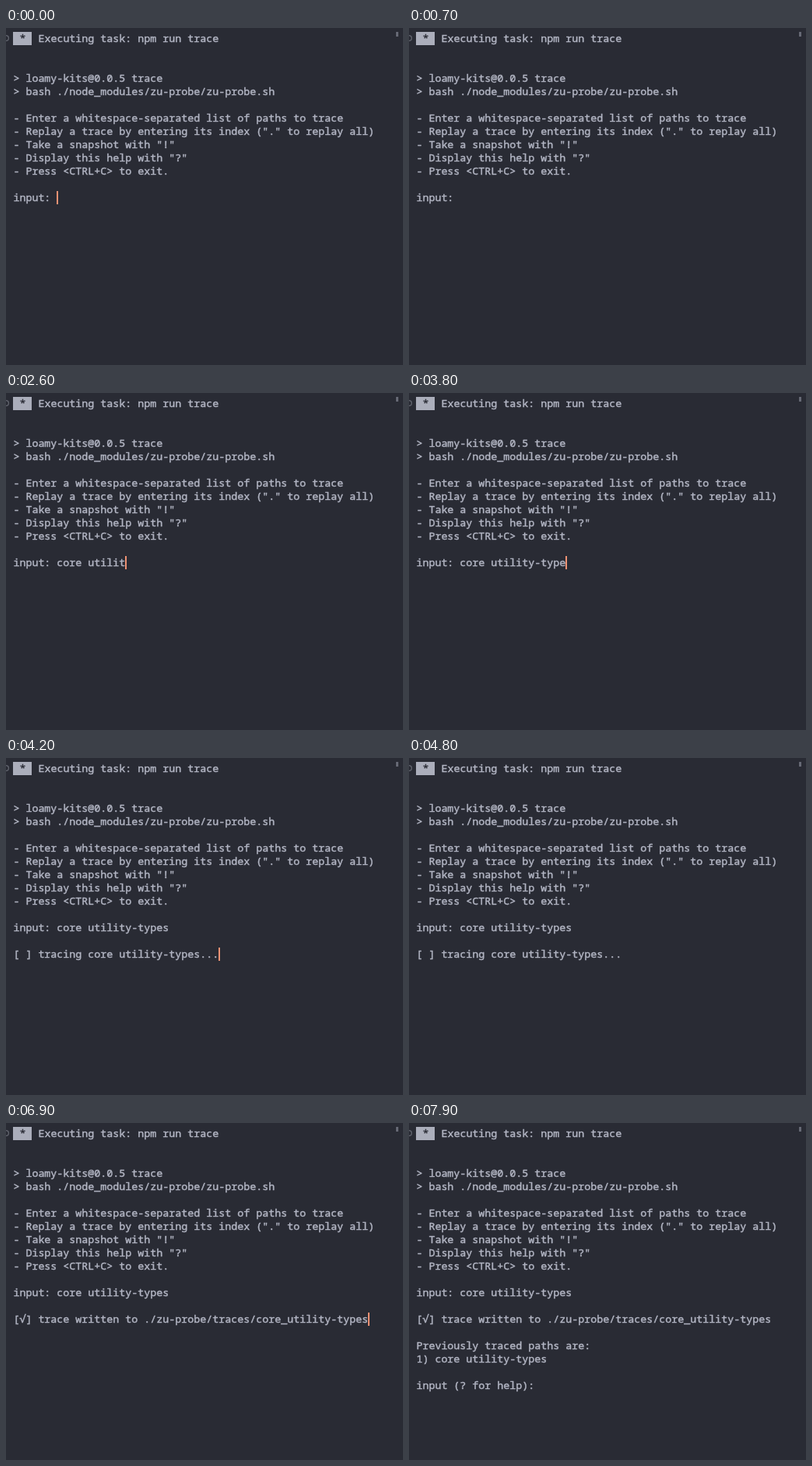
An HTML page for the animation above (8 s loop, 510x432 px).

```html
<!DOCTYPE html>
<html lang="en">
<head>
<meta charset="utf-8">
<title>Terminal trace</title>
<style>
  html, body { margin: 0; width: 100%; height: 100%; overflow: hidden; background: #292b34; }
  svg { display: block; width: 510px; height: 432px; }
  text {
    font: 500 13.3333px "Noto Sans Mono", "DejaVu Sans Mono", monospace;
    font-variant-ligatures: none;
    color: #b2b5c3;
    fill: currentColor;
    stroke: currentColor;
    stroke-width: 0.45px;
    white-space: pre;
  }
  .badge { fill: #abaebb; }
  .star { color: #292b34; }
  .ring { fill: none; stroke: #62656f; stroke-width: 1.3; }
  .thumb { fill: #666974; }
  #cursor { fill: #ee9274; }
</style>
</head>
<body>
<svg id="screen" viewBox="0 0 510 432">
  <rect class="thumb" x="501" y="5" width="3" height="6"/>
  <circle class="ring" cx="0" cy="13" r="3.4"/>
  <rect class="badge" x="9" y="5" width="24" height="17"/>
  <text class="star" x="17.4" y="18">*</text>
  <rect id="cursor" width="2" height="17"/>
</svg>
<script>
const LOOP = 8000, LEFT = 9, TOP = 5, CHAR = 8, ROW = 17, BASELINE = 13, BEARING = 0.4;
const screen = document.getElementById("screen");
const cursor = document.getElementById("cursor");

function addLine(row, text = "", col = 0) {
  const line = document.createElementNS("http://www.w3.org/2000/svg", "text");
  line.setAttribute("x", LEFT + BEARING + col * CHAR);
  line.setAttribute("y", TOP + row * ROW + BASELINE);
  line.textContent = text;
  screen.insertBefore(line, cursor);
  return line;
}

addLine(0, "Executing task: npm run trace", 4);
addLine(3, "> loamy-kits@0.0.5 trace");
addLine(4, "> bash ./node_modules/zu-probe/zu-probe.sh");
[
  "- Enter a whitespace-separated list of paths to trace",
  '- Replay a trace by entering its index ("." to replay all)',
  '- Take a snapshot with "!"',
  '- Display this help with "?"',
  "- Press <CTRL+C> to exit."
].forEach((text, i) => addLine(6 + i, text));

const paths = "core utility-types";
const prompt = "input: ";

// Moments at which the typed text reaches a length
const keys = [
  [1300, 2], [1400, 3], [1600, 4], [1700, 5], [1900, 6], [2000, 7],
  [2200, 8], [2300, 9], [2400, 10], [2600, 11], [2800, 12], [3100, 13],
  [3300, 14], [3500, 15], [3700, 16], [3800, 17], [4000, 18]
];

// Output lines: start, row, text
const output = [
  [4200, 14, "[ ] tracing " + paths + "..."],
  [6800, 14, "[√] trace written to ./zu-probe/traces/core_utility-types"],
  [7200, 16, "Previously traced paths are:"],
  [7200, 17, "1) " + paths],
  [7300, 19, "input (? for help): "]
];

// Moments at which the cursor blinks off and on
const blinks = [700, 1300, 4800, 5400, 6000, 6600, 7200, 7300, 7900];

const lines = {};
for (const row of [12, 14, 16, 17, 19]) lines[row] = addLine(row);

function setText(row, text) {
  if (lines[row].textContent !== text) lines[row].textContent = text;
}

function draw(time) {
  const typed = keys.reduce((n, [at, length]) => time >= at ? length : n, 0);
  const shown = { 12: prompt + paths.slice(0, typed) };
  let active = 12;
  for (const [at, row, text] of output) {
    if (time < at) break;
    shown[row] = text;
    active = row;
  }
  for (const row in lines) setText(row, shown[row] || "");

  cursor.setAttribute("x", LEFT + shown[active].length * CHAR);
  cursor.setAttribute("y", TOP + active * ROW);
  const hidden = blinks.filter(at => time >= at).length % 2;
  cursor.setAttribute("visibility", hidden ? "hidden" : "visible");
}

const start = performance.now();
function tick() {
  draw((performance.now() - start) % LOOP);
  requestAnimationFrame(tick);
}
tick();
</script>
</body>
</html>
```
